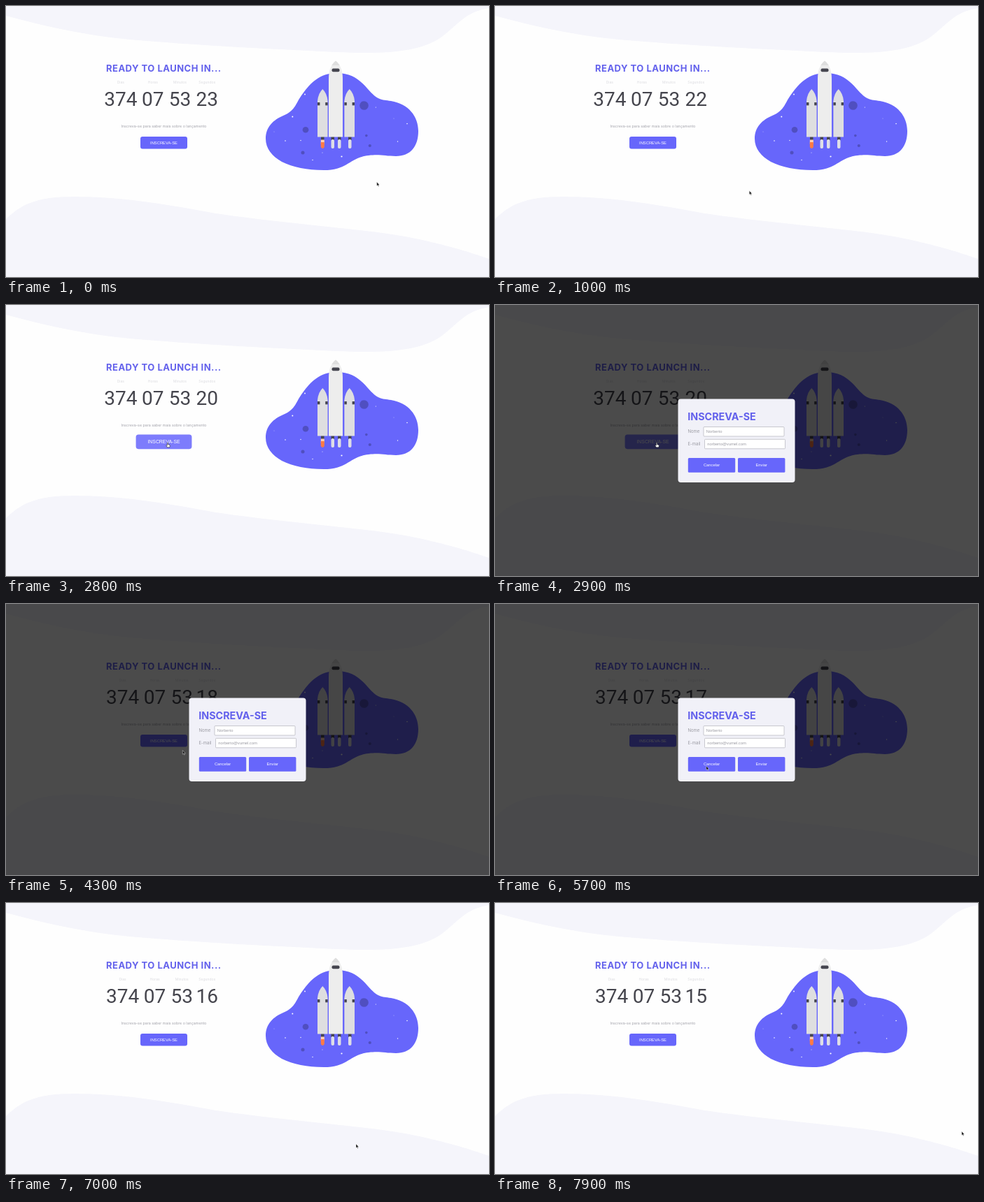
An HTML page that plays this animation: 690x388 px, repeating every 8 s.

```html
<!DOCTYPE html>
<html lang="pt">
<head>
<meta charset="utf-8">
<title>Ready to launch</title>
<style>
  html, body { margin: 0; width: 100%; height: 100%; overflow: hidden; background: #fefefe; }
  svg { display: block; width: 100vw; height: 100vh; }
  text { font-family: Inter, sans-serif; }
  .mid { text-anchor: middle; }
  .arial { font-family: "Liberation Sans", Arial, sans-serif; font-size: 5.8px; }
  .head { font-weight: 700; fill: #6361ec; }
  .digits { font: 28px Roboto, sans-serif; fill: #45454d; }
  .label { font-size: 5px; fill: #dcdce0; }
  .field { fill: #fff; stroke: #b4b4bc; stroke-width: .7; }
  .hint { fill: #9a9aa2; }
</style>
</head>
<body>
<svg viewBox="0 0 690 388">
  <rect width="690" height="388" fill="#fefefe"/>
  <g fill="#f5f5fb">
    <path d="M0 0V14C70 33 130 45 200 50C300 58 420 64 500 67C560 68 595 62 620 46C643 30 655 8 690 3V0Z"/>
    <path d="M0 388V305C20 286 40 273 97 273C170 273 240 286 300 297C380 309 480 317 545 326C600 334 650 348 690 362V388Z"/>
  </g>

  <path fill="#6766fb" d="M371 190C371 173 382 163 396 157C415 149 413 139 425 124C438 106 452 96 473 96C494 96 506 106 517 119C531 135 536 134 550 136C575 140 589 158 589 179C589 201 578 215 557 215C541 215 535 212 518 214C490 217 489 235 454 235C430 235 410 231 394 223C380 215 371 204 371 190Z"/>
  <g id="planets" fill="#504fc0"></g>
  <g id="stars" fill="#fff"></g>

  <g fill="#45454f">
    <path d="M450 186h4.5v6h-4.5zM464.500 186h4.500v6h-4.500zM474 186h4.500v6h-4.500zM489 186h4.500v6h-4.500z"/>
  </g>
  <g fill="#dedee6">
    <rect x="464.500" y="191" width="4.500" height="13" rx="2"/>
    <rect x="474" y="191" width="4.500" height="13" rx="2"/>
    <rect x="489" y="191" width="4.500" height="13" rx="2"/>
  </g>
  <path fill="#ffd0b0" d="M449.800 191.500h5v6h-5z"/>
  <path fill="#ff7a45" d="M449.800 195h5v7q-2.500 4 -5 0z"/>
  <g id="boosters"></g>
  <path fill="#ededed" d="M461 187.500V104C461 92 465 83 471 78.500C477 83 481 92 481 104V187.500Z"/>
  <path fill="#dedede" d="M465.300 85Q467.500 81 471 78.500Q474.500 81 476.700 85Z"/>
  <rect x="465.500" y="89.500" width="11" height="4.800" rx="2" fill="#45454f"/>

  <text class="mid head" x="225.300" y="93.500" font-size="13" letter-spacing=".5">READY TO LAUNCH IN...</text>
  <g id="clock"></g>
  <text class="mid" x="225.500" y="174" font-size="5.300" fill="#a3a3ab">Inscreva-se para saber mais sobre o lançamento</text>
  <g id="join">
    <rect x="-33.500" y="-8.700" width="67" height="17.400" rx="3" fill="#6766fb"/>
    <rect id="glow" x="-33.500" y="-8.700" width="67" height="17.400" rx="3" fill="#fff"/>
    <text class="mid arial" y="2.100" fill="#fff">INSCREVA-SE</text>
  </g>

  <g id="modal">
    <rect width="690" height="388" fill="#000" opacity=".7"/>
    <rect x="261.500" y="134.500" width="167" height="119.500" rx="4" fill="#f1f1f8"/>
    <text class="head" x="275.300" y="164.600" font-size="14.300">INSCREVA-SE</text>
    <g font-size="6" fill="#9a9aa2">
      <text x="275.500" y="183">Nome</text>
      <text x="275.500" y="201">E-mail</text>
    </g>
    <rect class="field" x="298" y="174.500" width="115" height="13.500" rx="1"/>
    <rect class="field" x="299.500" y="192.300" width="115" height="13.500" rx="1"/>
    <text class="arial hint" x="301.800" y="183.200">Norberto</text>
    <text class="arial hint" x="303.300" y="201">norberto@vumel.com</text>
    <g fill="#6766fb">
      <rect x="275.800" y="219" width="67.400" height="20.700" rx="1.500"/>
      <rect x="347" y="219" width="67.400" height="20.700" rx="1.500"/>
    </g>
    <g fill="#fff">
      <text class="mid arial" x="309.500" y="231.200">Cancelar</text>
      <text class="mid arial" x="380.700" y="231.200">Enviar</text>
    </g>
  </g>

  <g id="cursor">
    <path id="arrow" fill="#111" stroke="#fff" stroke-width=".4" d="M0 0V5.600L1.300 4.500L2.200 6.500L3.100 6.100L2.200 4.200H3.900Z"/>
    <path id="hand" fill="#fff" stroke="#222" stroke-width=".6" d="M-.7 -.3Q0 -1.300 .7 -.3V2L3 2.600Q3.600 3 3.300 4L2.700 6H-.6L-2.200 3.500Q-2 2.600 -.7 3.400Z"/>
  </g>
</svg>
<script>
const $ = id => document.getElementById(id);

function add(parent, tag, attrs, text = "") {
  const el = document.createElementNS("http://www.w3.org/2000/svg", tag);
  for (const k in attrs) el.setAttribute(k, attrs[k]);
  el.textContent = text;
  return $(parent).appendChild(el);
}

const dots = (parent, list) => list.forEach(([cx, cy, r]) => add(parent, "circle", { cx, cy, r }));
dots("planets", [[511.5, 142.5, 6.3], [428, 177.3, 4.3], [424, 210, 2.5], [519.8, 200, 2.1], [514.8, 185.6, 1.8]]);
dots("stars", [
  [427, 126.5, .9], [409.3, 158.5, 1], [399, 193, .8], [421, 192.5, .7], [438, 220.5, .7], [479.5, 215.5, 1.1],
  [452, 210, .5], [528.3, 145, .6], [573, 168.5, .8], [559.5, 194, .7], [383, 180, .4], [554, 161, .4]
]);

for (const x of [445, 483.4]) {
  add("boosters", "path", { fill: "#dedee0", d: `M${x} 187.500V136Q${x + 1} 125 ${x + 7.3} 119Q${x + 13.600} 125 ${x + 14.600} 136V187.500Z` });
  for (const dx of [0, 11.2]) add("boosters", "rect", { x: x + dx, y: 138, width: 3.4, height: 4.3, fill: "#45454f" });
}

const columns = [["Dias", 163.8, "374"], ["Horas", 209.8, "07"], ["Minutos", 248.5, "53"], ["Segundos", 287.2, ""]]
  .map(([name, x, value]) => ({
    x,
    label: add("clock", "text", { class: "mid label", y: 111.3 }, name),
    digits: add("clock", "text", { class: "mid digits", y: 142.6 }, value)
  }));

// [time, x, y]
const path = [
  [0, 529.7, 252], [500, 440, 262], [1000, 363.3, 264.5], [1800, 297, 239], [2300, 232, 198], [2800, 231, 197.8],
  [4000, 231, 197.8], [4900, 295, 233], [5400, 301.8, 232], [6600, 301.8, 232], [7000, 500, 345],
  [7100, 700, 345], [7200, 700, 333], [7300, 688.3, 333], [7500, 692, 333], [7600, 692, 332], [7700, 686, 331],
  [7900, 666.7, 327], [8000, 666.7, 327]
];

const clamp = v => Math.max(0, Math.min(1, v));
const ease = v => { v = clamp(v); return v * v * (3 - 2 * v); };

function pointer(t) {
  const i = path.findIndex(p => p[0] > t);
  const [t0, x0, y0] = path[i - 1], [t1, x1, y1] = path[i];
  const k = (t - t0) / (t1 - t0);
  return [x0 + (x1 - x0) * k, y0 + (y1 - y0) * k];
}

const show = (id, on) => $(id).style.display = on ? "" : "none";

function draw(t) {
  const secs = String(23 - Math.floor((t + 900) / 1000));
  const shift = secs.includes("1") ? 2.8 : 0; // a narrow 1 tightens the row
  columns.forEach((c, i) => {
    const x = c.x + (i < 3 ? shift : 0);
    c.label.setAttribute("x", x);
    c.digits.setAttribute("x", x);
  });
  columns[3].digits.textContent = secs;

  const hover = ease((t - 2200) / 300) - ease((t - 2900) / 300);
  $("join").setAttribute("transform", `translate(225.500 195.800) scale(${1 + .19 * hover})`);
  $("glow").setAttribute("opacity", .14 * hover);

  show("modal", t >= 2900 && t < 6100);
  const hand = t >= 2200 && t < 4100;
  show("hand", hand);
  show("arrow", !hand);
  $("cursor").setAttribute("transform", `translate(${pointer(t)})`);
}

function tick() {
  draw(Math.floor(performance.now() % 8000 / 100) * 100); // ten poses a second
  requestAnimationFrame(tick);
}
tick();
</script>
</body>
</html>
```
